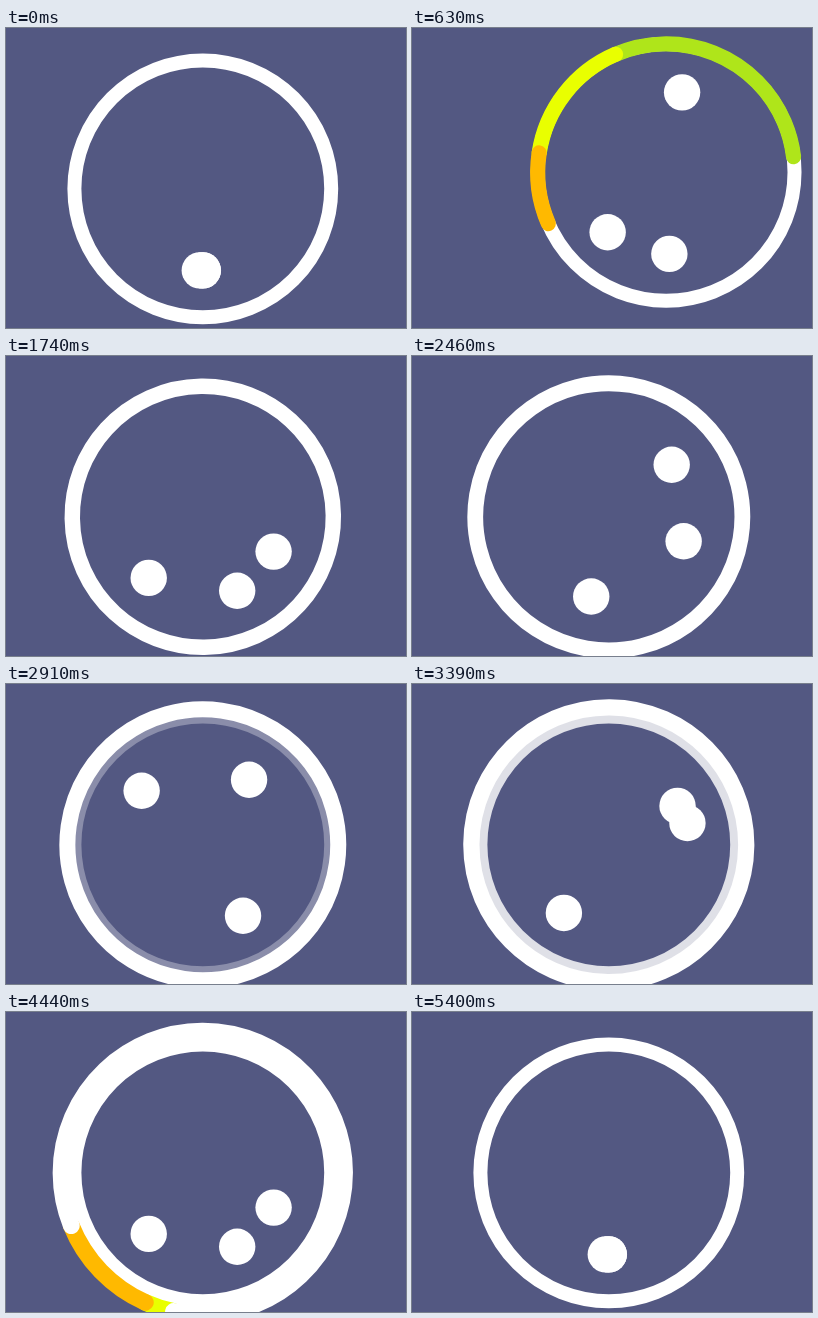
Animation of 400x300 px, one loop 5.7 s. Source, as an HTML page with a canvas:

```html
<!DOCTYPE html>
<html lang="en">
<head>
<meta charset="utf-8">
<title>Orbiting dots</title>
<style>
  html, body { margin: 0; width: 100%; height: 100%; overflow: hidden; background: #535882; }
  canvas { display: block; }
</style>
</head>
<body>
<canvas id="stage" width="400" height="300"></canvas>
<script>
const ctx = document.getElementById('stage').getContext('2d');
const LOOP = 5700, END = 5400, STEP = 30, CYCLE = 900;
const HOME = { x: 196.8, y: 160.8 };
const RADIUS = 128.4, ORBIT = 81.6, DOT = 18.2;

const clamp = v => Math.max(0, Math.min(1, v));
const ramp = (t, from, to) => clamp((t - from) / (to - from));
const rad = deg => deg * Math.PI / 180;
const lobe = x => Math.max(0, Math.sin(Math.PI * x));

// Each dot's turn from the bottom, in revolutions, over one cycle p = 0..1.
const dots = [
  { shift: 0, turn: p => (ramp(p, 0, 0.394) ** 0.6 + ramp(p, 0.697, 1) ** 0.6) / 2 },
  { shift: -3, turn: p => 0.662 * lobe(ramp(p, 0, 0.713)) ** 0.6
                        - 0.378 * lobe(ramp(p, 0.713, 1) ** 0.65) },
  { shift: 0, turn: p => 0.172 * lobe(ramp(p, 0.715, 1)) - 0.096 * lobe(ramp(p, 0, 0.715)) }
];

// Bottom layer first; the top layer is the first to leave.
const bands = [
  { color: '#afe51a', enter: 220 },
  { color: '#e9ff00', enter: 352 },
  { color: '#ffb900', enter: 464 },
  { color: '#ffffff', enter: 632 }
];
const ENTER_TIME = 555, LEAVE_START = 4282, LEAVE_GAP = 85, LEAVE_TIME = 400;

// The ring swings out on a spiral and settles back.
function ringCentre(t) {
  const reach = 63 * lobe(ramp(t, 0, 1480)) ** 2;
  const angle = rad(-16 - 1.133 * (t - 630));
  return { x: HOME.x + reach * Math.cos(angle), y: HOME.y + reach * Math.sin(angle) };
}

function strokeArc(c, radius, width, color, from, to) {
  if (to <= from) return;
  ctx.beginPath();
  ctx.arc(c.x, c.y, radius, rad(from), rad(to));
  ctx.lineWidth = width;
  ctx.strokeStyle = color;
  ctx.stroke();
}

function drawBands(c, t) {
  const scale = 1 + 0.104 * ramp(t, 1230, 4420);
  const start = (156.5 - 0.2033 * (t - 630)) % 360;
  const spans = bands.map(({ enter }, i) => {
    const leave = LEAVE_START + LEAVE_GAP * (bands.length - 1 - i);
    return {
      head: 360 * ramp(t, enter, enter + ENTER_TIME) ** 2,
      tail: 360 * ramp(t, leave, leave + LEAVE_TIME) ** 2
    };
  });
  // Only the parts that stick out from under the next band are drawn.
  spans.forEach(({ head, tail }, i) => {
    const cover = spans[i + 1] || { head: tail, tail };
    const part = (from, to) =>
      strokeArc(c, RADIUS * scale, 15.2 * scale, bands[i].color, start + from, start + to);
    part(tail, cover.tail);
    part(Math.max(tail, cover.head), head);
  });
}

function drawDots(c, t) {
  const phase = (t % CYCLE) / CYCLE;
  ctx.fillStyle = '#ffffff';
  for (const { shift, turn } of dots) {
    const a = rad(90 + 360 * turn(phase));
    ctx.beginPath();
    ctx.arc(c.x + shift + ORBIT * Math.cos(a), c.y + ORBIT * Math.sin(a), DOT, 0, 2 * Math.PI);
    ctx.fill();
  }
}

function draw(t) {
  ctx.fillStyle = '#535882';
  ctx.fillRect(0, 0, 400, 300);
  ctx.lineCap = 'round';
  const c = ringCentre(t);
  const alpha = t < 1200 ? 1 : ramp(t, 2600, 3575);
  strokeArc(c, RADIUS, 14, `rgba(255,255,255,${alpha})`, 0, 360);
  drawBands(c, t);
  drawDots(c, t);
}

const origin = performance.now();
function tick() {
  const t = (performance.now() - origin) % LOOP;
  draw(Math.min(END, Math.floor(t / STEP) * STEP));
  requestAnimationFrame(tick);
}
tick();
</script>
</body>
</html>
```
